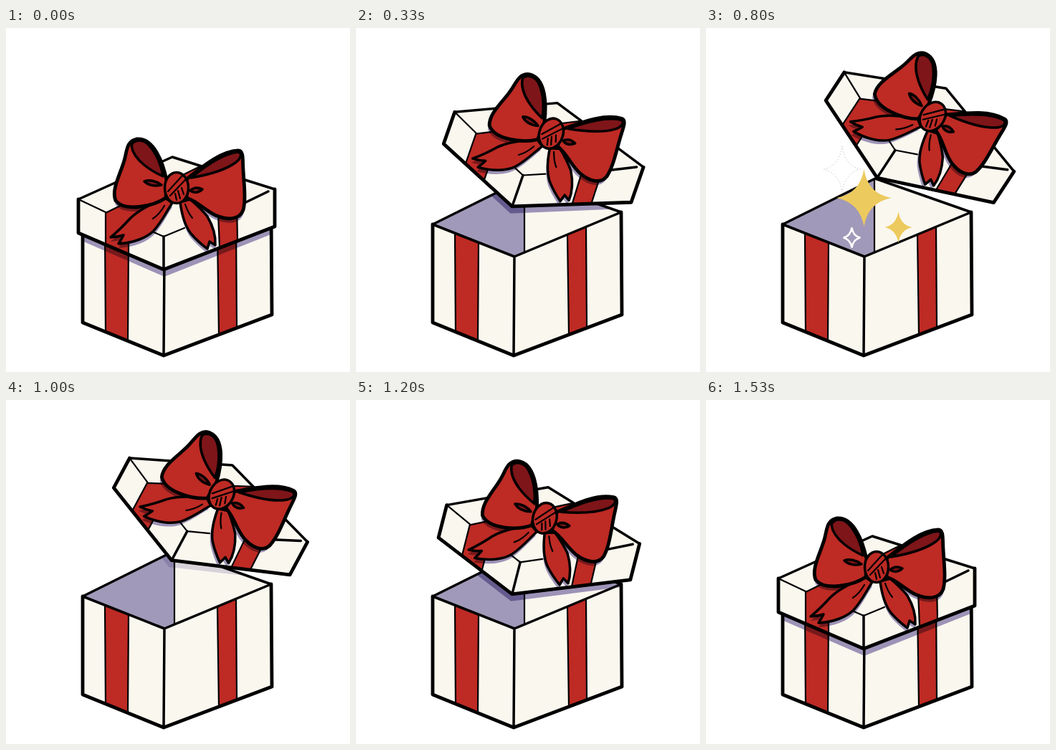
An HTML page that plays this animation: 480x480 px, repeating every 1740 ms.

```html
<!DOCTYPE html>
<html lang="en">
<head>
<meta charset="utf-8">
<title>Gift box</title>
<style>
  html, body { margin: 0; width: 100%; height: 100%; overflow: hidden; background: #fff; }
  svg { display: block; width: 100vw; height: 100vh; }
  .ink { fill: none; stroke: #000; stroke-width: 3.5; stroke-linejoin: round; stroke-linecap: round; }
  .thin { stroke-width: 2.2; }
  .bold { stroke-width: 4.8; }
  .cream { fill: #faf7ef; }
  .red { fill: #be2a24; }
  .dark { fill: #7e1519; }
  .lilac { fill: #a199b9; }
  .shade { fill: #a098c4; mix-blend-mode: multiply; }
  .gold { fill: #edca5d; }
</style>
</head>
<body>
<svg viewBox="0 0 480 480">
  <defs>
    <clipPath id="boxArea"><path d="M107 274L236 210L370 257L371 400L220 457L107 411Z"/></clipPath>
    <clipPath id="lidArea"><path id="lidShape" d="M101 239L232 180L375 225L375 277L220 337L101 286Z"/></clipPath>
    <path id="loopL" d="M224 212C219 188 206 152 182 155C167 158 169 174 164 188C158 207 147 226 153 241C166 257 205 249 223 237Z"/>
    <path id="loopR" d="M252 211C276 192 300 172 324 171C332 171 330 184 331 198C332 218 335 238 331 254C326 268 309 268 294 262C279 256 268 242 252 237Z"/>
    <path id="tailL" d="M222 237C198 248 184 255 173 266C164 276 157 283 146 292Q155 292 164 289Q161 295 157 301C179 300 197 292 206 283C217 271 223 258 232 244Z"/>
    <path id="tailR" d="M243 243C245 259 249 275 258 287C265 295 274 303 281 308L284 298L292 303C293 287 288 275 281 263C274 254 265 246 257 239Z"/>
    <g id="bow">
      <use href="#tailL"/><use href="#tailR"/><use href="#loopL"/><use href="#loopR"/>
    </g>
    <path id="star" vector-effect="non-scaling-stroke" d="M0 -40Q5 -6 38 0Q5 7 0 40Q-6 7 -38 0Q-6 -6 0 -40Z"/>
  </defs>

  <!-- open box -->
  <path class="lilac" d="M107 274L236 210V313L221 319Z"/>
  <path class="cream" d="M236 210L370 257L235 313Z"/>
  <path class="ink thin" d="M235 212V312"/>
  <path class="cream" d="M107 274L221 319L370 257L371 400L220 457L107 411Z"/>
  <path class="red" d="M138 287L171 300L170 436L139 424Z M295 289L321 278L322 418L297 428Z"/>
  <path class="ink thin" d="M138 287L139 424M171 300L170 436M295 289L297 428M321 278L322 418"/>
  <path class="ink" d="M107 274L236 210L370 257M107 274L221 319L370 257M221 319L220 457"/>
  <path class="ink bold" d="M107 274V411L220 457L371 400L370 257"/>
  <g id="cast" class="shade" clip-path="url(#boxArea)">
    <path id="castShape" d="M101 276L220 320L375 266V286L221 347L101 295Z"/>
  </g>

  <g id="lid">
    <use href="#lidShape" class="cream"/>
    <path class="red" d="M139 258L271 193L303 202L171 271V317L139 304Z M254 230L322 246L323 297L298 307L296 258Z"/>
    <path class="ink thin" d="M139 302V258L271 193M171 315V271L303 202M298 306L296 258M323 297L322 246"/>
    <g class="shade" clip-path="url(#lidArea)"><use href="#bow" x="0" y="6"/></g>
    <use href="#lidShape" class="ink"/>
    <path class="ink thin" d="M101 239L139 257M190 278L220 291L249 279"/>
    <path class="ink" d="M335 243L366 228M220 291V337"/>
    <path class="ink bold" d="M101 239V286L220 337L375 277V225"/>

    <use href="#tailL" class="ink red"/>
    <use href="#tailR" class="ink red"/>
    <path class="ink thin" d="M221 248Q214 260 205 266M250 246Q254 258 260 265"/>
    <use href="#loopL" class="ink bold red"/>
    <use href="#loopR" class="ink bold red"/>
    <path class="ink dark" d="M175 164C178 156 190 154 199 163C210 175 217 192 219 207C206 201 178 186 175 164Z"/>
    <path class="ink dark" d="M258 209C280 191 303 175 324 173C331 175 327 183 320 188C306 198 282 205 258 209Z"/>
    <path class="ink dark" d="M193 214C200 211 211 214 217 219C208 221 199 220 193 214Z"/>
    <path class="ink dark" d="M257 227C262 222 268 222 274 225C269 230 262 231 257 227Z"/>
    <ellipse class="ink red" cx="238" cy="223" rx="16.5" ry="21.5"/>
    <path class="ink thin" d="M226 228L246 206M229 234L251 211M236 231L238 240M240 227L243 238M245 223L248 232"/>
  </g>

  <g id="sparks"></g>
</svg>
<script>
  const LOOP = 1740, FPS = 15;
  const $ = id => document.getElementById(id);
  const lerp = (a, b, u) => a + (b - a) * u;
  const clamp = v => Math.min(1, Math.max(0, v));
  const linear = u => u;
  const easeOut = u => 1 - (1 - u) ** 2;
  const easeIn = u => u * u;

  // drawing index, tilt, front corner x, y, easing towards the next key
  const keys = [
    [1, 0, 220, 291, linear],
    [2, 4.4, 221.5, 268, linear],
    [5, 19.2, 233, 205.5, easeOut],
    [9, 33.2, 264, 170.5, linear],
    [12, 33.2, 264, 170.5, easeIn],
    [17, 19.2, 233, 205.5, linear],
    [20, 4.4, 221.5, 268, easeOut],
    [23, 0, 220, 301, linear]
  ];

  // x, y, scale x, scale y, style
  const sparks = [
    [190, 197, 0.67, 0.81, 'fill="#fff" stroke="#aaa" stroke-dasharray="1 3"'],
    [220.5, 237, 1, 1, 'class="gold"'],
    [268.5, 278, 0.5, 0.55, 'class="gold"'],
    [203.5, 292.5, 0.31, 0.35, 'fill="#a199b9" stroke="#fff" stroke-width="2.5"']
  ];
  $('sparks').innerHTML = sparks.map(s => `<use href="#star" ${s[4]}/>`).join('');
  const stars = [...$('sparks').children];

  function pose(n) {
    const i = keys.findIndex(k => k[0] > n);
    const a = keys[i < 0 ? keys.length - 1 : Math.max(0, i - 1)];
    const b = keys[i < 0 ? keys.length - 1 : i];
    const u = a === b ? 0 : a[4]((n - a[0]) / (b[0] - a[0]));
    return [1, 2, 3].map(j => lerp(a[j], b[j], u));
  }

  // sparkles grow and shrink around the widest opening
  const glow = n => clamp(1 - (Math.abs(n - 10.5) - 1.5) * 0.3);

  function draw(ms) {
    const n = Math.floor((ms % LOOP + 4) * FPS / 1000);
    const [tilt, x, y] = pose(Math.max(1, n));
    const move = `translate(${x} ${y}) rotate(${tilt}) translate(-220 -291)`;
    $('lid').setAttribute('transform', move);
    $('castShape').setAttribute('transform', move);
    $('cast').setAttribute('opacity', clamp((33 - tilt) / 13));

    const g = glow(n);
    $('sparks').style.display = g > 0.2 ? '' : 'none';
    sparks.forEach(([px, py, sx, sy], i) =>
      stars[i].setAttribute('transform', `translate(${px} ${py}) scale(${sx * g} ${sy * g})`));
  }

  const start = performance.now();
  function tick() {
    draw(performance.now() - start);
    requestAnimationFrame(tick);
  }
  draw(0);
  tick();
</script>
</body>
</html>
```
